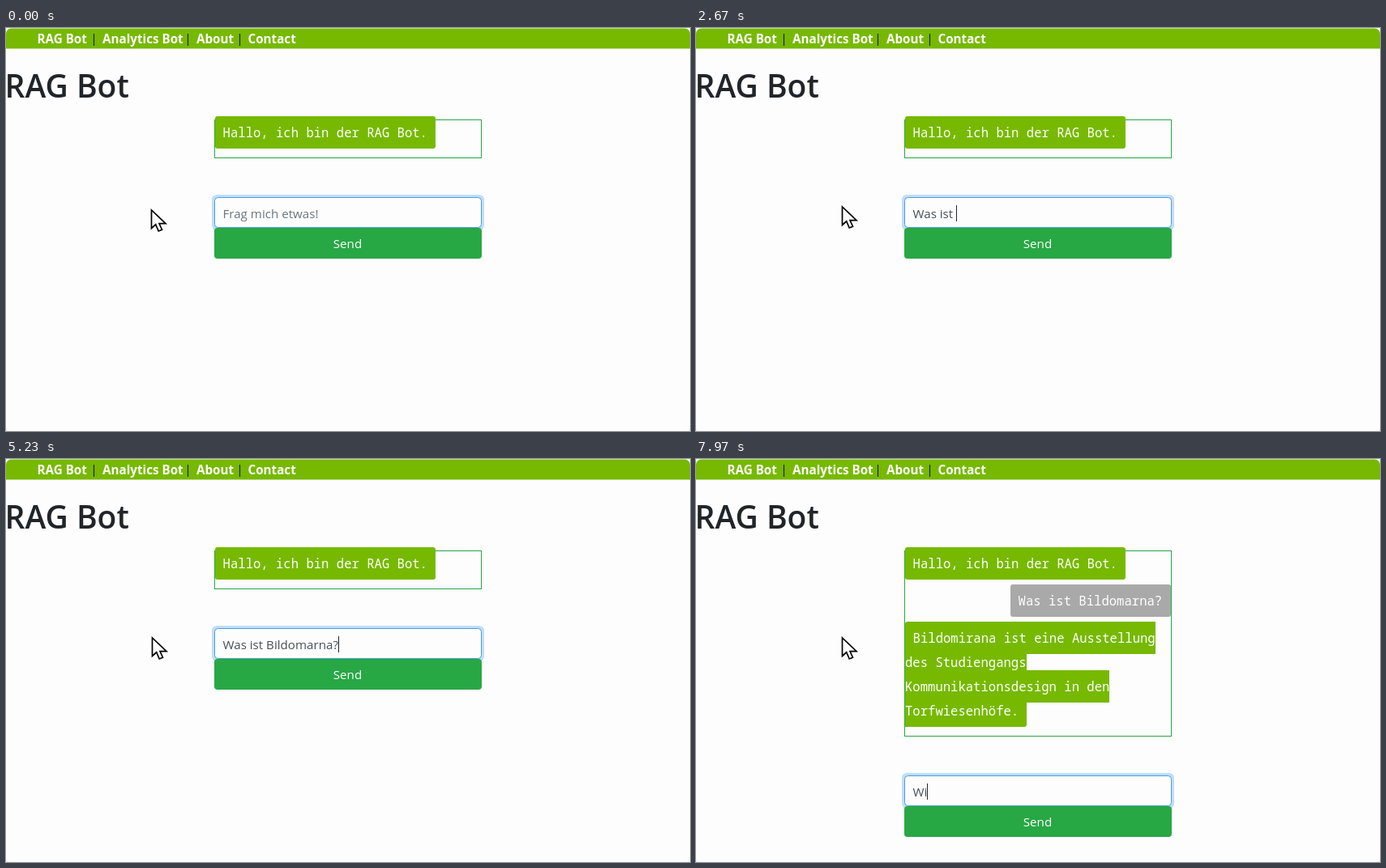
Animation, 844 px wide and 498 px high, one loop 8 s. Source, as an HTML page:

```html
<!DOCTYPE html>
<html lang="de">
<head>
<meta charset="utf-8">
<title>RAG Bot</title>
<style>
  html, body { margin: 0; width: 100%; height: 100%; overflow: hidden; background: #f4f4f4; }
  svg { display: block; width: 100%; height: 100%; }
  text { white-space: pre; font: 15.15px "Open Sans", "Noto Sans", sans-serif; }
  .nav text { font-size: 15.2px; font-weight: 700; fill: #fff; }
  .nav path { stroke: #212529; stroke-width: 1.2; }
  .title { font-size: 39px; font-weight: 600; fill: #212529; }
  .mono { font: 15.58px "Noto Sans Mono", "DejaVu Sans Mono", monospace; fill: #fff; }
  .bot { fill: #76b900; }
  .user { fill: #a9a9a9; }
</style>
</head>
<body>
<svg viewBox="0 0 844 498">
  <rect width="844" height="498" rx="6" fill="#fdfdfd"/>
  <g class="nav">
    <path class="bot" style="stroke:none" d="M0 25.5V8Q0 .5 7 .5H837Q844 .5 844 8V25.5Z"/>
    <text x="38.5" y="19">RAG Bot</text>
    <text x="119" y="19">Analytics Bot</text>
    <text x="235" y="19">About</text>
    <text x="298.5" y="19">Contact</text>
    <path d="M108.5 7V22M224.5 7V22M288.5 7V22"/>
  </g>
  <text class="title" x="-1.5" y="86">RAG Bot</text>

  <rect id="box" x="257.5" y="113.5" width="329" height="47" fill="none" stroke="#28a745"/>
  <g id="chat"></g>

  <g id="form">
    <rect x="254" y="206" width="336" height="44" rx="6" fill="#bfdeff"/>
    <rect x="257.5" y="209.5" width="329" height="37" rx="4" fill="#fdfdfd" stroke="#4d9fd6"/>
    <text id="field" x="267.5" y="235"></text>
    <path id="caret" stroke="#212529" d="M.5 219V239"/>
    <rect x="257" y="247" width="330" height="38" rx="4" fill="#28a745"/>
    <text x="421.5" y="272" text-anchor="middle" fill="#fff">Send</text>
  </g>

  <path id="mouse" d="M1 1V23.5L6.2 18.8L9.7 27L14 25.2L10.5 17.6H18.5Z"
        fill="#fff" stroke="#000" stroke-width="1.7"/>
</svg>
<script>
const LOOP = 8000, SENT = 5800, REPLY = 6760, BLINK = 530;
const CHAR = 9.348, PAD = 10, LINE = 30;
const QUESTION = "Was ist Bildomarna?";
const ANSWER = [
  "Bildomirana ist eine Ausstellung",
  "des Studiengangs",
  "Kommunikationsdesign in den",
  "Torfwiesenhöfe."
];
const $ = id => document.getElementById(id);
const [box, chat, form, field, caret, mouse] =
  ["box", "chat", "form", "field", "caret", "mouse"].map($);

function add(parent, tag, attrs, text = "") {
  const el = document.createElementNS("http://www.w3.org/2000/svg", tag);
  for (const key in attrs) el.setAttribute(key, attrs[key]);
  el.textContent = text;
  return parent.appendChild(el);
}

// An inline bubble: padding and round corners only at its first and last line.
function bubble(lines, kind, y, alignRight) {
  const g = add(chat, "g", {});
  lines.forEach((line, i) => {
    const first = i === 0, last = i === lines.length - 1;
    const w = Math.round(line.length * CHAR + (first ? PAD : 0) + (last ? PAD : 0));
    const x = alignRight ? 586 - w : 258, top = y + i * LINE;
    const l = first ? 3 : 0, r = last ? 3 : 0;
    add(g, "path", {
      class: kind,
      d: `M${x + l} ${top}H${x + w - r}q${r} 0 ${r} ${r}v${40 - 2 * r}q0 ${r} ${-r} ${r}` +
         `H${x + l}q${-l} 0 ${-l} ${-l}V${top + l}q0 ${-l} ${l} ${-l}Z`
    });
    add(g, "text", { class: "mono", x: x + (first ? PAD - .4 : 0), y: top + 26 }, line);
  });
  return g;
}

bubble(["Hallo, ich bin der RAG Bot."], "bot", 109);
const question = bubble([QUESTION], "user", 155, true);
const answer = bubble(ANSWER, "bot", 201);

// Every edit of the input: [time, value]
const edits = [[-600, ""]];
const type = (text, times) =>
  times.forEach((time, i) => edits.push([time, text.slice(0, text.length - times.length + i + 1)]));
type(QUESTION.slice(0, 8), [440, 590, 750, 910, 1090, 1260, 1400, 1560]);
type(QUESTION.slice(0, 18), Array.from({ length: 10 }, (_, i) => 2840 + i * 190));
type(QUESTION, [5100]);
edits.push([SENT, ""]);
type("Wi", [7650, 7850]);

const show = (el, on) => el.setAttribute("visibility", on ? "visible" : "hidden");

function draw(t) {
  const sent = t >= SENT, replied = t >= REPLY;
  const shift = replied ? 182 : sent ? 46 : 0;
  show(question, sent);
  show(answer, replied);
  box.setAttribute("height", 47 + shift);
  form.setAttribute("transform", `translate(0 ${shift})`);

  const [time, value] = edits.filter(e => e[0] <= t).pop();
  field.textContent = value;
  const x = 268 + Math.floor(value ? field.getComputedTextLength() : 0);
  caret.setAttribute("transform", `translate(${x} 0)`);
  show(caret, (t - time) % (2 * BLINK) < BLINK);
  field.setAttribute("fill", value ? "#495057" : "#6c757d");
  if (!value) field.textContent = "Frag mich etwas!";

  const p = Math.min(1, Math.max(0, (t - 30) / 400));
  const ease = p * p * (3 - 2 * p);
  mouse.setAttribute("transform", `translate(${178.5 + ease} ${224 - 4 * ease})`);
}

const start = performance.now();
function tick() {
  draw((performance.now() - start) % LOOP);
  requestAnimationFrame(tick);
}
tick();
</script>
</body>
</html>
```
